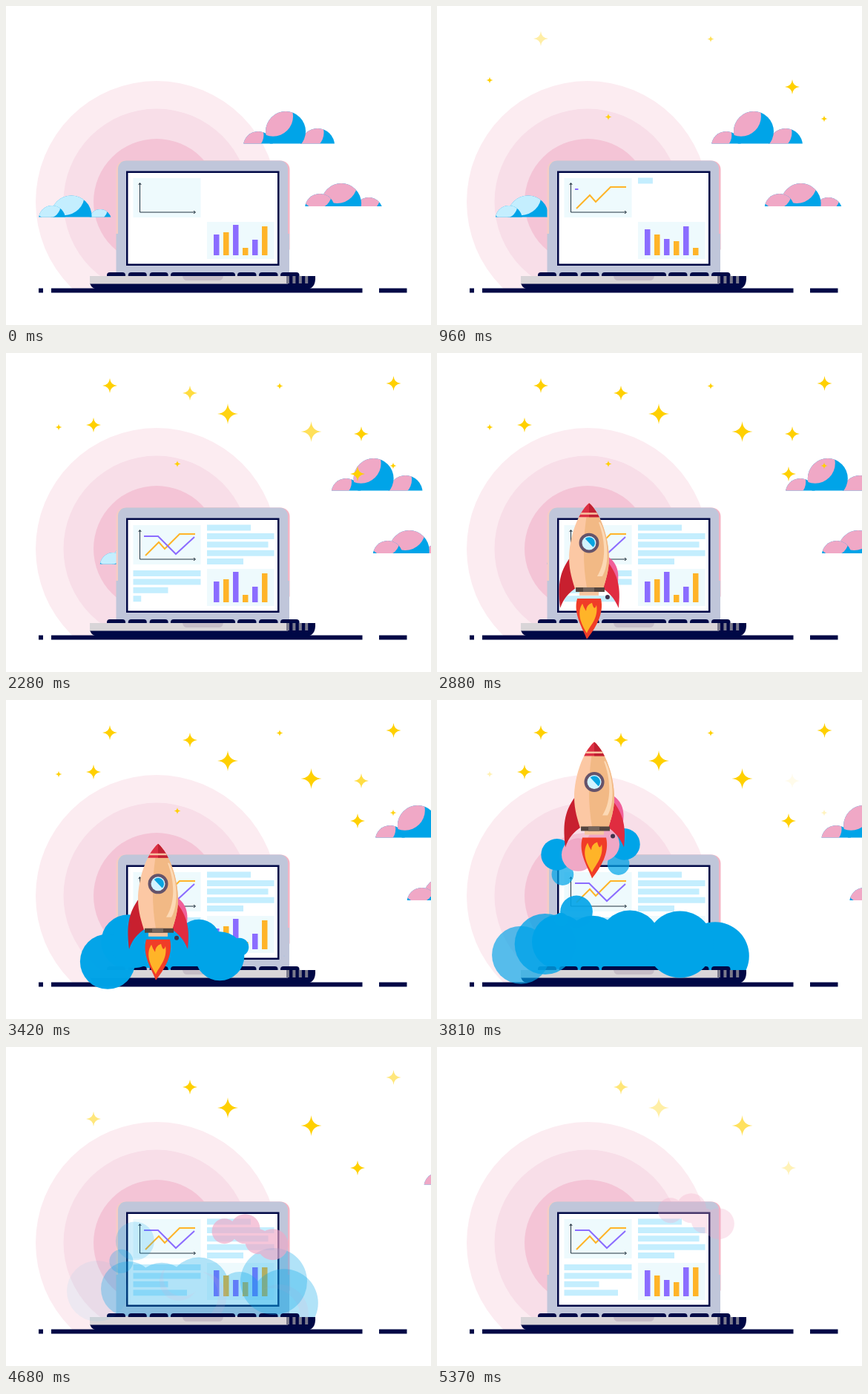
Write an HTML page with a canvas that moves like this. It is 573 by 430 pixels and loops after 5400 ms.

```html
<!DOCTYPE html>
<html lang="en">
<head>
<meta charset="utf-8">
<title>Rocket launch</title>
<style>
html, body { margin: 0; width: 100%; height: 100%; overflow: hidden; background: #fff; }
canvas { display: block; }
</style>
</head>
<body>
<canvas id="stage" width="573" height="430"></canvas>
<script>
const c = document.getElementById('stage').getContext('2d');
const LOOP = 5400;
const NAVY = '#000846', BLUE = '#00a4e8', PINK = '#f0a8c6', ICE = '#c4eefe',
  YELLOW = '#ffb428', PURPLE = '#8b6cff', PANEL = '#eefafd';

const clamp = v => Math.max(0, Math.min(1, v));
const part = (t, a, b) => clamp((t - a) / (b - a));
const easeOut = p => 1 - (1 - p) ** 2;
const smooth = p => p * p * (3 - 2 * p);

function rect(color, x, y, w, h, r = 0) {
  c.fillStyle = color;
  c.beginPath();
  c.roundRect(x, y, w, h, r);
  c.fill();
}
function disc(color, x, y, r) {
  c.fillStyle = color;
  c.beginPath();
  c.arc(x, y, r, 0, 7);
  c.fill();
}
function shape(color, d) {
  c.fillStyle = color;
  c.fill(new Path2D(d));
}
function layer(draw) {
  c.save();
  draw();
  c.restore();
}
function clipRect(x, y, w, h) {
  c.beginPath();
  c.rect(x, y, w, h);
  c.clip();
}
function addDisc(path, x, y, r) {
  path.moveTo(x + r, y);
  path.arc(x, y, r, 0, 2 * Math.PI);
}

// Each bump is lit by a disc of its own size, shifted by a fraction of its radius
function drawCloud(t, speed, base, light, [dx, dy], bumps) {
  layer(() => {
    c.translate(speed * t, 0);
    clipRect(0, 0, 573, base);
    for (const [x, y, r] of bumps) layer(() => {
      disc(BLUE, x, y, r);
      c.clip();
      disc(light, x + dx * r, y + dy * r, r);
    });
  });
}
function drawClouds(t) {
  drawCloud(t, .052, 185.5, PINK, [-.63, -.75], [[420, 188, 23], [340, 189, 20], [377, 169, 27]]);
  drawCloud(t, .0402, 270, PINK, [-.2, -1], [[489, 277, 19], [452, 266, 27], [423, 273, 20]]);
  drawCloud(t, .0362, 284.5, ICE, [-.35, -1.03], [[127, 289, 15], [88, 283, 27.5], [62, 287, 18]]);
}

// Stars by radius: x, y, time of appearance
const stars = {
  4.5: [[71, 100, 130], [522, 152, 100], [231, 149.5, 400], [369, 44.5, 570]],
  10: [[479, 109, 0], [140, 44, 750], [118, 97, 1130], [522.5, 41, 1130], [474, 163, 1680], [248, 54, 1830]],
  14: [[299, 82, 1720], [411.5, 106, 1890]]
};
function drawStars(t) {
  const fade = 600, life = 3260;
  for (const r in stars) for (const [x, y, on] of stars[r]) layer(() => {
    c.globalAlpha = part(t, on, on + fade) * (1 - part(t, on + life, on + life + fade));
    c.translate(x, y);
    c.scale(r, r);
    shape('#ffd000', 'M0-1Q.08-.08 1 0Q.08 .08 0 1Q-.08 .08-1 0Q-.08-.08 0-1Z');
  });
}

function polyline(color, width, points, p = 1) {
  if (!p) return;
  let length = 0;
  c.beginPath();
  points.forEach(([x, y], i) => {
    c.lineTo(x, y);
    if (i) length += Math.hypot(x - points[i - 1][0], y - points[i - 1][1]);
  });
  c.setLineDash([length * p, 999]);
  c.strokeStyle = color;
  c.lineWidth = width;
  c.stroke();
  c.setLineDash([]);
}

function drawChart(t) {
  const ink = '#23323f';
  rect(PANEL, 171.5, 232, 91, 53);
  polyline(ink, 1, [[180.5, 239], [180.5, 278], [255, 278]]);
  polyline(ink, 1, [[178.7, 241], [180.5, 238.5], [182.3, 241]]);
  polyline(ink, 1, [[253, 276.2], [255.5, 278], [253, 279.8]]);
  polyline(YELLOW, 2, [[188, 273], [206, 255], [214, 264], [234, 244], [255, 244]], part(t, 150, 900));
  polyline(PURPLE, 2, [[186, 247], [205, 247], [229, 271], [254, 248]], part(t, 910, 1900));
}

const barsA = [28, 31, 41, 10, 21, 39], barsB = [35, 28, 22, 19, 39, 10];
function drawBars(t) {
  rect(PANEL, 271, 291, 90.5, 50);
  const first = smooth(part(t, 250, 700)) * (1 - smooth(part(t, 1300, 1750)));
  const second = smooth(part(t, 3700, 4250));
  barsA.forEach((a, i) => {
    const h = a + (barsB[i] - a) * (i < 5 ? first + second : first);
    rect(i % 2 ? YELLOW : PURPLE, 280 + 13 * i, 336 - h, 7.5, h);
  });
}

function typeRows(t, x, y, widths) {
  widths.forEach((w, i) => rect(ICE, x, y + 11.4 * i, w * clamp(t / 169 - i), 8));
}

function drawScreen(t) {
  rect(NAVY, 162, 222.5, 206.5, 127.5);
  rect('#fff', 164.5, 225, 201.5, 122.5);
  drawChart(t);
  drawBars(t);
  typeRows(t - 904, 271, 231.5, [59, 90.5, 82.5, 90.5, 49]);
  typeRows(t - 904 - 5 * 169, 171.5, 293, [91, 91, 47, 72.5]);
}

function drawLid() {
  rect('#f5b4c4', 200, 208.5, 182.5, 120, [0, 12, 0, 0]);
  rect('#f6cdc4', 148.5, 208.5, 150, 120, [12, 0, 0, 0]);
  rect('#c0c6da', 151, 208.5, 229, 120, [11, 11, 0, 0]);
  rect('#c0c6da', 148.5, 307, 233.5, 57);
}

function drawBase() {
  const key = (x, w) => rect(NAVY, x, 359, w, 5.5, [4, 4, 0, 0]);
  key(222, 87);
  for (let i = 0; i < 3; i++) {
    key(136 + 28.8 * i, 25);
    key(312 + 29 * i, 25.5);
  }
  shape(NAVY, 'M113 374V364H417Q418 381 405 382H125Q116 382 113 374Z');
  rect('#d9d5d8', 113, 364, 267, 10.5);
  shape('#c5bcc6', 'M238 364H293Q292 370 287 370H244Q239 370 238 364Z');
  for (let i = 0; i < 4; i++) rect('#7b7a8c', 378 + 8.4 * i, 364, 4, 10);
}

const fadeFrom = (t, start, time = 1200) => 1 - part(t, start, start + time);

// Bank of smoke behind the keyboard, widening to the right
function drawBank(t) {
  if (t < 3100) return;
  layer(() => {
    clipRect(0, 0, 573, 366);
    c.globalAlpha = fadeFrom(t, 3850);
    const bank = new Path2D();
    bank.rect(165, 335, 210 * easeOut(part(t, 3150, 3800)), 26);
    [326, 330, 325, 333, 345].forEach((y, i) => {
      const born = 3100 + 80 * i, r = i === 3 ? 30 : 37 + 2.2 * i;
      addDisc(bank, 165 + 42.5 * i + 2.5 * i * i, y, r * easeOut(part(t, born, born + 350)));
    });
    c.fillStyle = BLUE;
    c.fill(bank);
  });
}

// Single puffs slow down on their way: x, y, dx, dy, radius, birth, fade start
const puffs = [
  [181, 369, -83, -31, 39, 2950, 3400], [205, 329, -82, 0, 41, 3100, 3550],
  [249, 361, 112, -45, 45, 3130, 3850], [199, 304, -26, -44, 26, 3450, 3700],
  [172, 299, -18, -11, 16, 3600, 3800]
];
function drawPuffs(t) {
  for (const [x, y, dx, dy, r, born, fade] of puffs) layer(() => {
    const way = easeOut(part(t, born, born + 1500));
    c.globalAlpha = fadeFrom(t, fade);
    disc(BLUE, x + dx * way, y + dy * way, r * easeOut(part(t, born, born + 600)));
  });
}

// Pairs of puffs that fly up on both sides of the flame
function drawTrail(t, color, r, gap, spread, y, rise, fade) {
  const born = 3650, s = (t - born) / 1000;
  if (s <= 0) return;
  layer(() => {
    c.globalAlpha = fadeFrom(t, fade, 750);
    for (const side of [-1, 1])
      disc(color, 207 + side * (gap + spread * s), y - 7 * side - rise * s,
        r * easeOut(part(t, born, born + 220)));
  });
}

// Disc minus the same disc shifted by dx, dy
function crescent(x, y, r, dx, dy) {
  layer(() => {
    const outside = new Path2D();
    outside.rect(0, 0, 573, 430);
    addDisc(outside, x + dx, y + dy, r);
    c.clip(outside, 'evenodd');
    disc('#e6a4ca', x, y, r);
  });
}
function drawCrescents(t) {
  layer(() => {
    clipRect(0, 0, 573, 366);
    c.globalAlpha = .85 * part(t, 4000, 4200) * fadeFrom(t, 4300, 450);
    crescent(233, 316, 26, 5, -6);
    crescent(262, 338, 35, -11, -3);
    crescent(368, 360, 40, -11, 5);
  });
}

function drawPinkCloud(t) {
  if (t < 3900) return;
  const s = (t - 4290) / 1000, grow = easeOut(part(t, 3900, 4250));
  layer(() => {
    c.globalAlpha = fadeFrom(t, 4000, 1950);
    c.translate(29.5 * s, -40.5 * s);
    const cloud = new Path2D();
    for (const [x, y, r] of [[283, 264, 17], [311, 261, 20], [328, 278, 17], [348, 282, 21]])
      addDisc(cloud, x, y, r * grow);
    c.fillStyle = PINK;
    c.fill(cloud);
  });
}

const BODY = 'M0 0C16 14 27 48 27 75C27 92 22 106 19 116H-19C-22 106-27 92-27 75C-27 48-16 14 0 0Z';
function drawRocket(t) {
  const scale = easeOut(part(t, 2550, 2900));
  const lift = .000557 * Math.max(0, t - 3300) ** 2;
  if (!scale || lift > 420) return;
  layer(() => {
    c.translate(205 + .018 * Math.max(0, t - 3420), 292 - lift);
    c.scale(scale, scale);
    c.translate(0, -90);
    shape('#f0609a', 'M25 72C40 82 42 98 37 116L22 112Z');
    shape('#c8202f', 'M-25 73C-42 95-42 115-39 142C-34 128-28 122-17 114Z');
    shape('#e02c40', 'M24 78C40 98 43 115 40 142C34 128 28 122 17 114Z');
    disc('#40334e', 25, 127, 3);
    rect('#f6c6a0', -13, 119, 26, 6);
    shape('#f03c28', 'M-16 129C-22 150-8 170-3 184C8 170 21 150 16 129Z');
    shape('#ffb428', 'M-9 136C-18 150-9 166-3 176C1 166 13 156 10 138Q7 147 4 135Q-4 138-4 146Q-7 142-9 136Z');
    layer(() => {
      c.clip(new Path2D(BODY));
      rect('#fcc8a4', -30, 0, 60, 120);
      shape('#f2b985', 'M0 0C-8 35-10 80-2 120H30V0Z');
      shape('#fcd9b5', 'M13 26C22 50 24 78 11 99H18C29 80 25 45 15 26Z');
      rect('#dc3044', -30, 0, 60, 19);
      rect('#c02032', 0, 0, 30, 19);
      rect('#f8c3a0', -30, 13, 60, 2.5);
    });
    rect('#54463f', -18, 114, 39, 6);
    rect('#75655c', -8, 114, 15, 6);
    disc('#65536a', 0, 54, 13.5);
    disc('#d2f4ff', 0, 54, 9.5);
    c.fillStyle = '#08a4e0';
    c.beginPath();
    c.arc(0, 54, 8, -2.3, .8);
    c.fill();
  });
}

function drawRings() {
  layer(() => {
    clipRect(0, 0, 573, 381);
    disc('#fcecf1', 203, 264, 163);
    disc('#f8dee8', 203, 264, 125.5);
    disc('#f4c4d6', 203, 264, 85);
  });
}

function draw(t) {
  c.clearRect(0, 0, 573, 430);
  drawRings();
  drawClouds(t);
  drawStars(t);
  for (const [x, w] of [[44, 6], [61, 419.5], [503, 37.5]]) rect(NAVY, x, 380.5, w, 6);
  drawLid();
  drawScreen(t);
  drawBank(t);
  drawCrescents(t);
  drawBase();
  drawPuffs(t);
  drawTrail(t, BLUE, 16, 36, 10, 249, 130, 3600);
  drawTrail(t, BLUE, 23, 36, 58, 255, 333, 3950);
  drawTrail(t, PINK, 24, 10, 42, 266, 400, 3950);
  drawRocket(t);
  drawPinkCloud(t);
}

const start = performance.now();
function tick() {
  draw((performance.now() - start) % LOOP);
  requestAnimationFrame(tick);
}
tick();
</script>
</body>
</html>
```
